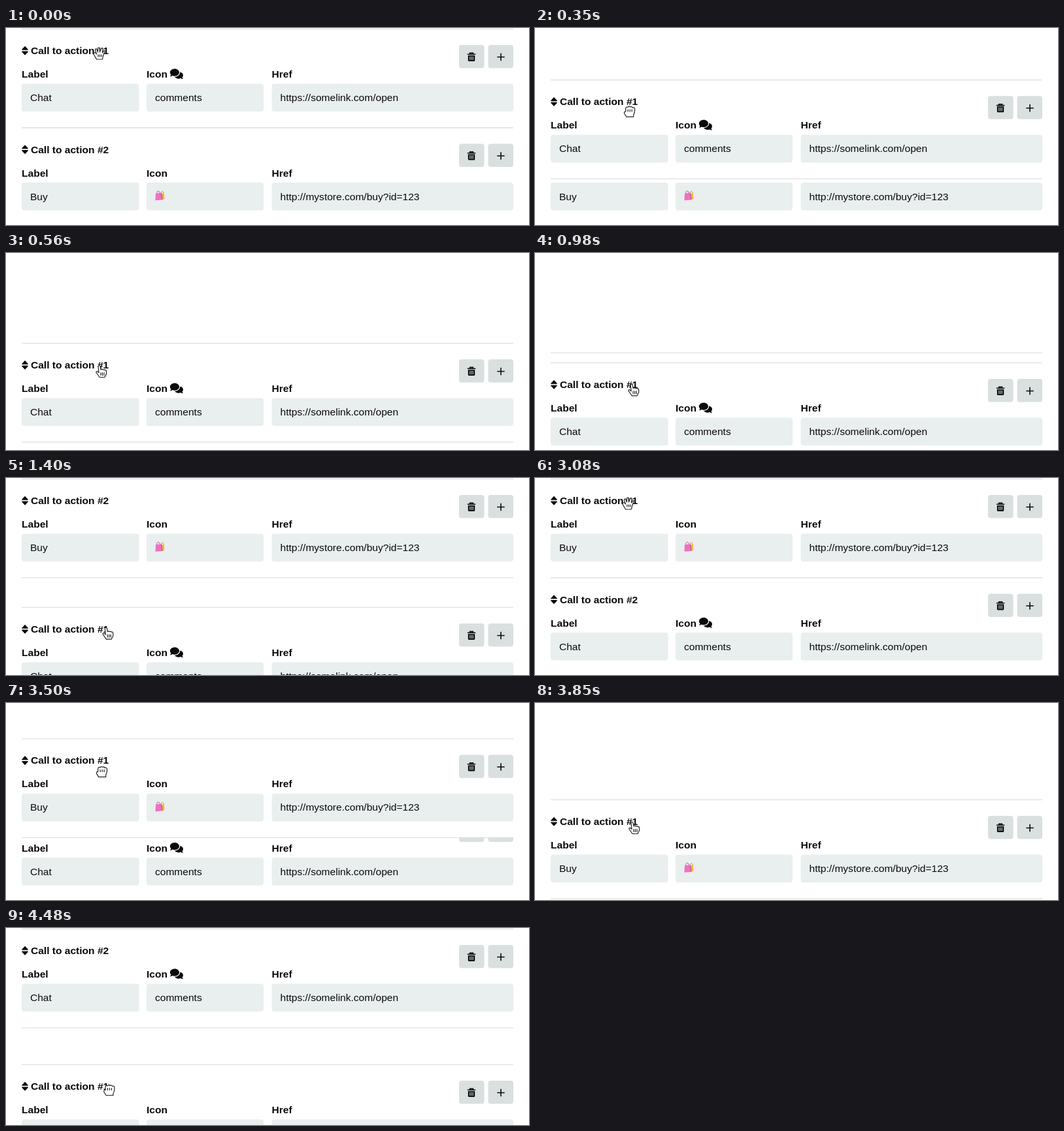
Write an HTML page that moves like this. It is 800x302 px and loops after 4.55 s.

```html
<!DOCTYPE html>
<html lang="en">
<head>
<meta charset="utf-8">
<title>Sortable call to action list</title>
<style>
  html, body { margin: 0; width: 100%; height: 100%; overflow: hidden; background: #fff; }
  svg { display: block; }
  text { font: 15.55px "Liberation Sans", Arial, sans-serif; fill: #0a0a0a; white-space: pre; }
  .bold { font-weight: bold; }
  .line { fill: #dcdfdf; }
  .field { fill: #e9eeee; }
  .button { fill: #d9e0df; }
  .ink { fill: #0a0a0a; }
  .stroke { fill: none; stroke: #0a0a0a; stroke-width: 1.6; }
  #hand { fill: #fff; stroke: #222; stroke-width: 1.2; stroke-linejoin: round; stroke-linecap: round; }
</style>
</head>
<body>
<svg id="stage" width="800" height="302" viewBox="0 0 800 302"></svg>
<script>
const LOOP = 4550, STEP = 70, SLOT = 151.5;
const stage = document.getElementById('stage');

const addNode = name => stage.appendChild(document.createElementNS(stage.namespaceURI, name));
const rect = (cls, x, y, w, h, r = 0) =>
  `<rect class="${cls}" x="${x}" y="${y}" width="${w}" height="${h}" rx="${r}"/>`;
const text = (x, y, s, cls = '') => `<text class="${cls}" x="${x}" y="${y}">${s}</text>`;
const column = (x, w, label, value) =>
  text(x, 76, label, 'bold') + rect('field', x, 85.5, w, 42.5, 4) + text(x + 13, 112, value);

const comments = `
  <path class="ink" d="M258 62.5c4 0 7 2.5 7 5.6s-3 5.6-7 5.6q-2 0-3.4-.6-1.6 1.2-3.8 1.2 1.2-1.3 1.6-2.7-1.6-1.5-1.6-3.5c0-3.1 3.2-5.6 7.2-5.6Z"/>
  <path class="ink" d="M266.3 67.4c2.8.7 4.7 2.6 4.7 5q0 1.9-1.5 3.3.5 1.4 1.5 2.6-2.2 0-3.8-1.2-1.5.6-3.2.6c-2.7 0-5-1.2-6-2.9 4.8 0 8.3-3 8.3-7.4Z"/>`;

const bags = `
  <g transform="translate(34.3 15) scale(.85)">
    <path d="M238 103q1-5 3.5-4t2 4" fill="none" stroke="#c98a28"/>
    <path d="M237 103l7-1 1 10-5 2.5Z" fill="#f3b63c"/>
    <path d="M231 103q0-5 2.5-5t3 4" fill="none" stroke="#a9459a"/>
    <path d="M229 102.5l9-1 2.5 12.5-12 1Z" fill="#ee70c5"/>
    <path d="M238 101.5l2 1.5 1.5 10-1 1Z" fill="#b94b9f"/>
  </g>`;

const trash = `
  <path class="stroke" d="M705.8 40.3h12.4M709.6 40v-1.6h4.8V40"/>
  <path class="ink" d="M706.8 42h10.4v7.5q0 1.5-1.5 1.5h-7.4q-1.5 0-1.5-1.5Z"/>
  <path stroke="#d9e0df" d="M709.7 43.5v5.7M712 43.5v5.7M714.3 43.5v5.7"/>`;

function makeItem(label, icon, href, picture) {
  const g = addNode('g');
  g.innerHTML = `
    <rect x="24" y="1" width="752" height="152" fill="#fff"/>
    ${rect('line', 24, 0.8, 752, 1.2)}${rect('line', 24, 0.8 + SLOT, 752, 1.2)}
    <path class="ink" stroke="#0a0a0a" stroke-width="1.3" stroke-linejoin="round" d="M24.8 33.2l4.2-4.6 4.2 4.6ZM24.8 36.2l4.2 4.6 4.2-4.6Z"/>
    ${text(38, 40, '', 'bold title')}
    ${column(24, 179.5, 'Label', label)}
    ${column(215, 179, 'Icon', icon)}
    ${column(406.5, 369.5, 'Href', href)}
    ${rect('button', 693, 26, 38.5, 35.5, 4)}${rect('button', 737.5, 26, 38.5, 35.5, 4)}
    ${trash}
    <path class="stroke" d="M751.3 44.5h11.4M757 38.8v11.4"/>
    ${picture}`;
  const title = g.querySelector('.title');
  return {
    g,
    place(y, number) {
      g.setAttribute('transform', `translate(0 ${y})`);
      title.textContent = 'Call to action #' + number;
    }
  };
}

const chat = makeItem('Chat', 'comments', 'https://somelink.com/open', comments);
const buy = makeItem('Buy', '', 'http://mystore.com/buy?id=123', bags);

const hand = addNode('path');
hand.id = 'hand';
const HANDS = {
  open: 'M-4 9L-8 2Q-9-1-7-1.5Q-6-1.5-4 1L-6-5Q-6-7.5-4-7L-2-2V-8Q-1-10 .5-8L1-2 3-7.5Q5-9 5.5-7L5-1 7-4Q9-5 8.5-3L6 4 5 9ZM-1.5 2v3M1 2v3M3.5 2v3',
  point: 'M-5-8Q-3.5-10-2-8L-1-2.5Q.5-4 2-2.5 3.5-3.5 5-2 7-2.5 7.5-.5V4L5 9H-3L-7 3Q-9 1-7.5 0-6-.5-4 2ZM-1 2v4M1.5 2v4M4 2v4',
  fist: 'M-5 8L-8 3Q-9 0-6 0V-5Q-5-8-2.5-6.5-1-9 1-7 3-8.5 4.5-6 8-7 8-3 8 2 6 5V8ZM-2.5-3v3M.5-3v3M3.5-3v3'
};

// Each drag pulls the first item down: a quick leg until `turn`, then a slow one until `end`.
const drags = [
  { item: chat, other: buy, start: 70, turn: 560, end: 1540, swap: 1190, quick: 137, slow: 70, sway: [3.5, 12] },
  { item: buy, other: chat, start: 3300, turn: 3850, end: 4480, swap: 4060, quick: 147, slow: 61, sway: [9.5, 6] }
];
const DROP = 1610, LEAVE = 1890, RETURN = 2660, GRAB_LEAD = 70;

const ramp = (t, a, b) => Math.min(1, Math.max(0, (t - a) / (b - a)));
const legs = (t, d, start, quick, slow) =>
  quick * ramp(t, start, d.turn) + slow * ramp(t, d.turn, d.end);

function handShape(t, d) {
  if (t < d.start || t >= DROP && d === drags[0]) return 'open';
  return t > d.turn - 200 && t < d.swap + 300 ? 'point' : 'fist';
}

function drawHand(t) {
  const d = t < RETURN ? drags[0] : drags[1];
  const lead = d.start - GRAB_LEAD;
  const x = 142.5 + legs(t, d, lead, ...d.sway);
  let y = 39 + legs(t, d, lead, d.quick + 5.5, d.slow - 4);
  if (t >= RETURN) y -= 35 * (1 - ramp(t, RETURN, RETURN + 280));
  hand.setAttribute('d', HANDS[handShape(t, d)]);
  hand.setAttribute('transform', `translate(${x} ${y})`);
  hand.style.display = t >= LEAVE && t < RETURN ? 'none' : '';
}

function draw(t) {
  const d = t < DROP ? drags[0] : drags[1];
  d.item.place(legs(t, d, d.start, d.quick, d.slow), 1);
  d.other.place(t < d.swap ? SLOT : 0, 2);
  if (hand.previousSibling !== d.item.g) stage.insertBefore(d.item.g, hand);
  drawHand(t);
}

function frame() {
  draw(Math.floor(performance.now() % LOOP / STEP) * STEP);
  requestAnimationFrame(frame);
}
frame();
</script>
</body>
</html>
```
